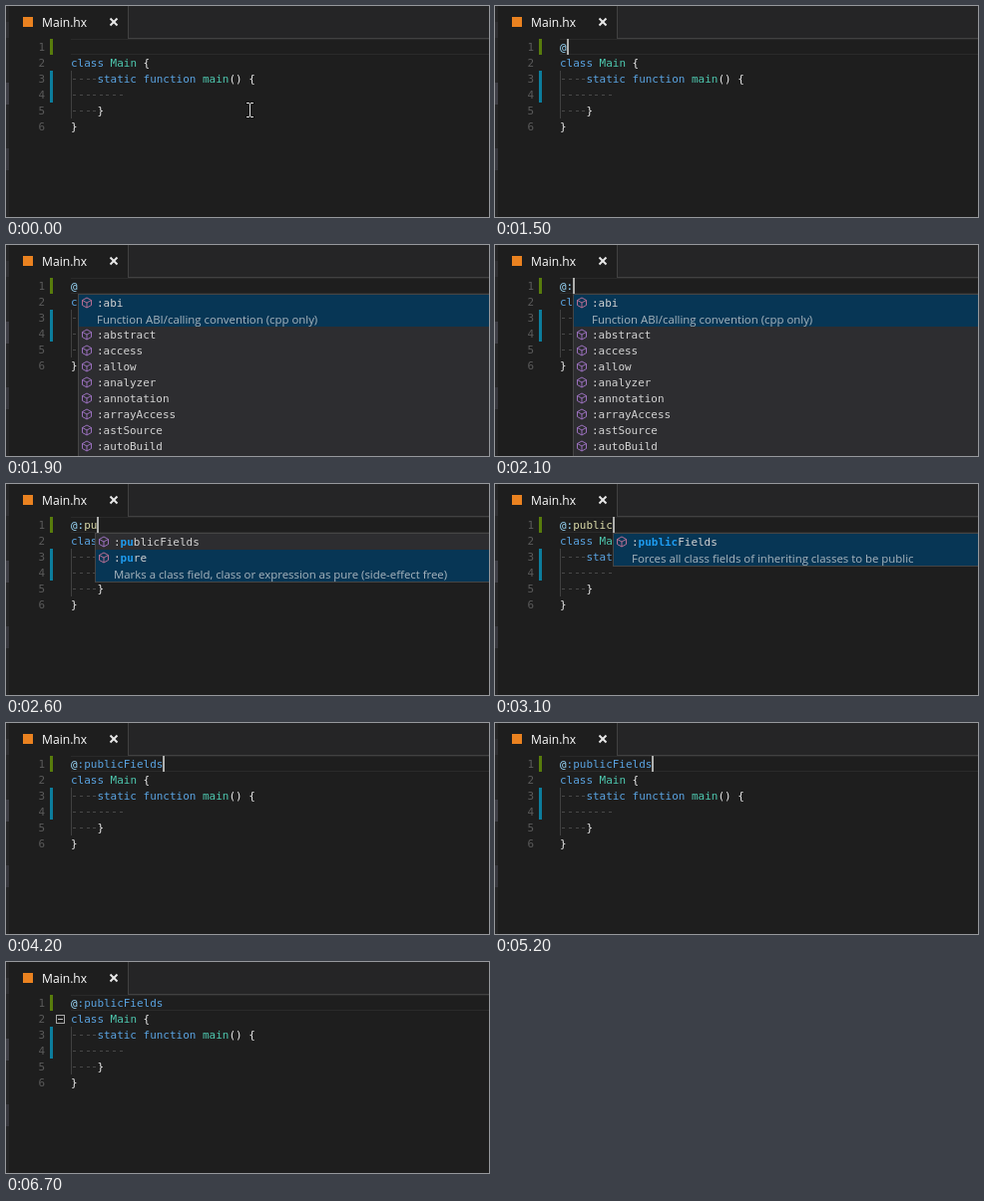
These frames come from a looping animation (484 by 212 pixels, 7.2 s). An HTML page with a canvas:

```html
<!DOCTYPE html>
<html lang="en">
<head>
<meta charset="utf-8">
<title>Metadata completion</title>
<style>
html, body { margin: 0; width: 100%; height: 100%; overflow: hidden; background: #1e1e1e; }
canvas { display: block; width: 484px; height: 212px; }
</style>
</head>
<body>
<canvas id="stage" width="484" height="212"></canvas>
<script>
const ctx = document.getElementById('stage').getContext('2d');
const LOOP = 7200, STEP = 100;
const LEFT = 65, TOP = 33, ROW = 16, CHAR = 6.6;
const MONO = '10.96px "DejaVu Sans Mono", monospace';
const UI = '"Open Sans", "Noto Sans", sans-serif';
const COLOR = {
  text: '#d4d4d4', brace: '#ececec', keyword: '#5aa4e2', type: '#4ec9b0', at: '#9cdcfe',
  name: '#dcdcaa', match: '#1e9cf0', number: '#5a5a5a', space: '#484848', edge: '#414141'
};

const ALL = [':abi', ':abstract', ':access', ':allow', ':analyzer',
  ':annotation', ':arrayAccess', ':astSource', ':autoBuild', ':bind'];
const ABI = 'Function ABI/calling convention (cpp only)';
const PURE = 'Marks a class field, class or expression as pure (side-effect free)';
const FIELDS = 'Forces all class fields of inheriting classes to be public';

const typing = [
  [0, ''], [1500, '@'], [2000, '@:'], [2500, '@:p'], [2600, '@:pu'], [2800, '@:pub'],
  [2900, '@:publ'], [3000, '@:publi'], [3100, '@:public'], [4200, '@:publicFields']
];
const fieldsMenu = (x, match) => ({ x, items: [':publicFields'], selected: 0, note: FIELDS, match });
const menus = [
  [0, null],
  [1600, { x: 72, items: ALL, selected: 0, note: ABI, match: 0 }],
  [2100, { x: 78, items: ALL, selected: 0, note: ABI, match: 0 }],
  [2600, { x: 89, items: [':publicFields', ':pure'], selected: 1, note: PURE, match: 2 }],
  [2800, fieldsMenu(98, 3)],
  [2900, fieldsMenu(105, 4)],
  [3000, fieldsMenu(111, 5)],
  [3100, fieldsMenu(118, 6)],
  [4200, null]
];
const caretOn = [[500, 1000], [1500, 1900], [2000, 3500], [4000, 4600], [5200, 5700], [6200, 6700]];

const valueAt = (track, t) => track.filter(([start]) => start <= t).pop()[1];
const clamp = v => Math.max(0, Math.min(1, v));
const smooth = v => { v = clamp(v); return v * v * (3 - 2 * v); };

function rect(color, x, y, w, h) {
  ctx.fillStyle = color;
  ctx.fillRect(x, y, w, h);
}

function text(string, x, y, color, font = MONO) {
  ctx.font = font;
  ctx.fillStyle = color;
  ctx.fillText(string, x, y);
}

function line(color, width, points) {
  ctx.strokeStyle = color;
  ctx.lineWidth = width;
  ctx.beginPath();
  points.forEach(([x, y]) => ctx.lineTo(x, y));
  ctx.stroke();
}

// Draws coloured runs one after another, starting at a character column.
function code(row, column, ...runs) {
  for (const [string, color] of runs) {
    text(string, LEFT + column * CHAR, TOP + row * ROW + 12, color);
    column += string.length;
  }
}

function spaces(row, count) {
  for (let i = 0; i < count; i++) {
    rect(COLOR.space, LEFT + Math.round((i + 0.5) * CHAR) - 1, TOP + row * ROW + 8, 3, 1);
  }
}

function drawFrame() {
  rect('#1e1e1e', 0, 0, 484, 212);
  rect('#252526', 123, 0, 361, TOP);
  rect(COLOR.edge, 122, 0, 1, TOP);
  rect(COLOR.edge, 122, TOP - 1, 362, 1);
  rect('#252526', 0, 0, 3, 212);
  rect('#2f2f32', 0, 16, 3, 16);
  rect('#3f3f46', 0, 77, 3, 22);
  rect('#37373d', 0, 143, 3, 22);

  rect('#ea8220', 17, 11, 10, 10);
  text('Main.hx', 36, 20.5, '#ffffff', '12.1px ' + UI);
  line('#e8e8e8', 2, [[104.5, 12.5], [111.5, 19.5]]);
  line('#e8e8e8', 2, [[111.5, 12.5], [104.5, 19.5]]);
}

function drawCode(typed, accepted) {
  rect('#2a2a2a', LEFT, TOP, 419, 1);
  rect('#2a2a2a', LEFT, TOP + 15, 419, 1);
  rect('#587c0c', 44, TOP, 3, ROW);
  rect('#0c7d9d', 44, TOP + 2 * ROW, 3, 2 * ROW);
  rect('#404040', LEFT, TOP + 2 * ROW, 1, 3 * ROW);

  for (let row = 0; row < 6; row++) {
    text(String(row + 1), 32.5, TOP + row * ROW + 12, COLOR.number);
  }
  code(0, 0, [typed.slice(0, 1), COLOR.at],
    [typed.slice(1, 2), accepted ? COLOR.keyword : COLOR.at],
    [typed.slice(2), accepted ? COLOR.keyword : COLOR.name]);
  code(1, 0, ['class ', COLOR.keyword], ['Main', COLOR.type], [' {', COLOR.brace]);
  spaces(2, 4);
  code(2, 4, ['static function ', COLOR.keyword], ['main', COLOR.type], ['() {', COLOR.brace]);
  spaces(3, 8);
  spaces(4, 4);
  code(4, 4, ['}', COLOR.brace]);
  code(5, 0, ['}', COLOR.brace]);
}

function drawCube(x, y, color) {
  line(color, 0.9, [[x, y - 5], [x + 4.5, y - 2.5], [x + 4.5, y + 2.5], [x, y + 5],
    [x - 4.5, y + 2.5], [x - 4.5, y - 2.5], [x, y - 5]]);
  line(color, 0.9, [[x - 4.5, y - 2.5], [x, y], [x + 4.5, y - 2.5]]);
  line(color, 0.9, [[x, y], [x, y + 5]]);
}

function drawMenu({ x, items, selected, note, match }) {
  const top = TOP + ROW, height = (items.length + 1) * ROW + 2;
  rect('#454545', x, top, 484 - x, height);
  rect('#2d2d30', x + 1, top + 1, 483 - x, height - 2);
  const nameX = x + 19;
  let y = top + 1;
  items.forEach((item, i) => {
    const active = i === selected;
    if (active) rect('#073655', x + 1, y, 483 - x, 2 * ROW);
    drawCube(x + 9, y + 8, active ? '#c9749a' : '#a678cc');
    text(':', nameX, y + 12, COLOR.text);
    text(item.slice(1, 1 + match), nameX + CHAR, y + 12, COLOR.match, 'bold ' + MONO);
    text(item.slice(1 + match), nameX + (1 + match) * CHAR, y + 12, COLOR.text);
    if (active) text(note, nameX, y + 29, '#a9b6bf', '11.4px ' + UI);
    y += active ? 2 * ROW : ROW;
  });
}

function drawFold(t) {
  if (t < 6000) return;
  ctx.globalAlpha = t >= 6400 ? 1 : smooth((t - 5900) / 340);
  ctx.strokeStyle = '#a8a8a8';
  ctx.lineWidth = 1;
  ctx.strokeRect(50.5, 53.5, 8, 8);
  rect('#c5c5c5', 52, 57, 5, 1);
  ctx.globalAlpha = 1;
}

function drawPointer(t) {
  if (t >= 1500) return;
  const rise = smooth(t / 500), settle = smooth((t - 500) / 200);
  const x = Math.round(244 + 7 * rise - 2 * settle);
  const y = Math.round(104 - 67 * rise + 4 * settle);
  const bars = [[-3, -7, 3, 1], [1, -7, 3, 1], [0, -6, 1, 13], [-3, 7, 3, 1], [1, 7, 3, 1]];
  for (const [dx, dy, w, h] of bars) rect('#111111', x + dx - 1, y + dy - 1, w + 2, h + 2);
  for (const [dx, dy, w, h] of bars) rect('#e6e6e6', x + dx, y + dy, w, h);
}

function draw(time) {
  const t = Math.floor(time % LOOP / STEP) * STEP;
  const typed = valueAt(typing, t), menu = valueAt(menus, t);
  drawFrame();
  drawCode(typed, t >= 4200);
  drawFold(t);
  if (caretOn.some(([from, to]) => t >= from && t < to)) {
    rect('#aeafad', Math.round(LEFT + typed.length * CHAR), TOP, 2, ROW);
  }
  if (menu) drawMenu(menu);
  drawPointer(t);
}

const start = performance.now();
function tick() {
  draw(performance.now() - start);
  requestAnimationFrame(tick);
}
tick();
</script>
</body>
</html>
```
